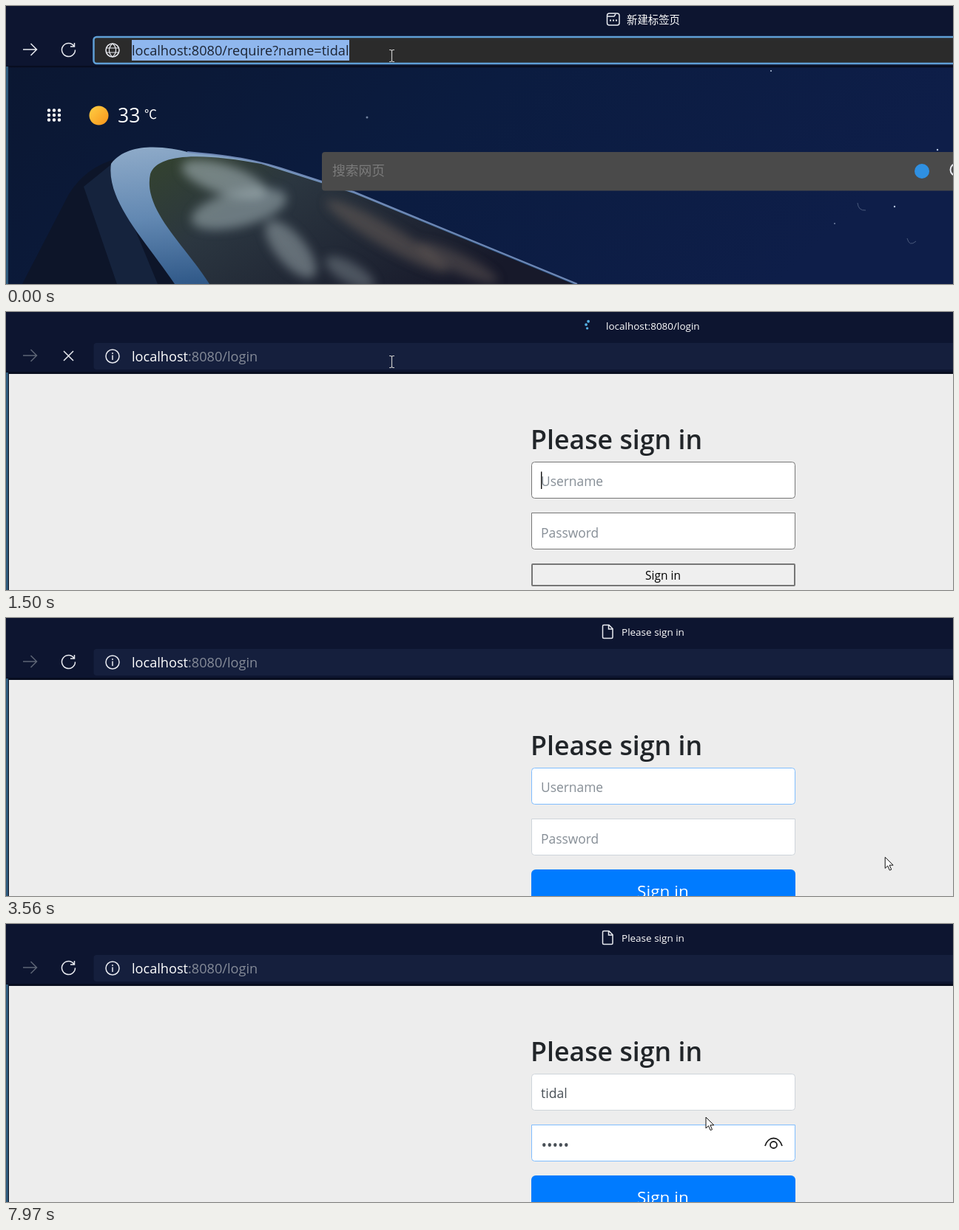
These frames come from a looping animation (1280x377 px, 8000 ms). An HTML page:

```html
<!DOCTYPE html>
<html lang="zh">
<head>
<meta charset="utf-8">
<title>Sign-in redirect</title>
<style>
  html, body { margin: 0; width: 100%; height: 100%; overflow: hidden; background: #0d1530; }
  svg { display: block; font-family: "Open Sans", "Noto Sans", sans-serif; }
  .cjk { font-family: "Noto Sans CJK SC", "Noto Sans CJK", sans-serif; }
  .line { fill: none; stroke: #e8eaf0; stroke-width: 1.5; }
  .url { font-size: 18.15px; fill: #858b98; }
  .url tspan { fill: #fff; }
  .tab { font-size: 13.5px; fill: #fff; }
  .hint { font-size: 17.4px; fill: #868e96; }
  .value { font-size: 17.6px; fill: #495057; }
</style>
</head>
<body>
<svg width="1280" height="377" viewBox="0 0 1280 377">
  <defs>
    <linearGradient id="sky" x2="1" y2=".25">
      <stop offset="0" stop-color="#0b1732"/><stop offset=".5" stop-color="#0b1c40"/><stop offset="1" stop-color="#0e1e49"/>
    </linearGradient>
    <linearGradient id="land" x2="1" y2=".5">
      <stop offset="0" stop-color="#34432f"/><stop offset=".35" stop-color="#2b3640"/><stop offset="1" stop-color="#17192a"/>
    </linearGradient>
    <linearGradient id="rim" x2=".3" y2="1">
      <stop offset="0" stop-color="#8fabc9"/><stop offset=".5" stop-color="#6288b2"/><stop offset="1" stop-color="#2c5585"/>
    </linearGradient>
    <linearGradient id="sun" x2="1" y2="1">
      <stop offset="0" stop-color="#ffd045"/><stop offset="1" stop-color="#f8941a"/>
    </linearGradient>
    <filter id="soft"><feGaussianBlur stdDeviation="7"/></filter>
    <clipPath id="inland"><use href="#ground"/></clipPath>
  </defs>

  <!-- browser bar -->
  <rect width="1280" height="377" fill="#0d1530"/>
  <g id="newTab">
    <rect class="line" x="812.5" y="10" width="16.5" height="16" rx="3"/>
    <path class="line" d="M813 14h9l2-3"/>
    <path d="M816 19.5h2m2 0h2m2 0h2" stroke="#fff" stroke-width="2"/>
    <text class="tab cjk" x="839" y="23.5" style="font-size:14.4px">新建标签页</text>
  </g>
  <g id="loadingTab">
    <g id="spinner" fill="#55b0e4"><circle r="1.9"/><circle r="1.9"/><circle r="1.7"/></g>
    <text class="tab" x="811" y="23.5">localhost:8080/login</text>
  </g>
  <g id="loginTab">
    <path class="line" d="M808 9.500h7l5 5v11.500q0 1.500-1.500 1.500h-10.500q-1.500 0-1.500-1.500v-15q0-1.500 1.500-1.500zM814.500 10v5h5"/>
    <text class="tab" x="832" y="23.5">Please sign in</text>
  </g>
  <path id="forward" class="line" d="M23 59h18.500M33.500 51l8 8-8 8"/>
  <path id="reload" class="line" d="M92 54.500a9 9 0 1 0 1.500 5M92.500 50v5h-5.500"/>
  <path id="stop" class="line" d="M78 53l13 13m0-13l-13 13"/>
  <rect id="bar" x="118.5" y="42" width="1180" height="36" rx="4"/>
  <circle class="line" cx="144" cy="60" r="9"/>
  <g id="focusedUrl">
    <path class="line" style="stroke-width:1.2" d="M135 57h18M135 63h18M144 51c-6 5-6 13 0 18c6-5 6-13 0-18"/>
    <rect x="170" y="46" width="294" height="28" fill="#8fb7ee"/>
    <text class="url" x="170" y="66.5" style="fill:#1c2433">localhost:8080/require?name=tidal</text>
  </g>
  <g id="plainUrl">
    <path class="line" d="M144 58.500v6.500M144 55v2"/>
    <text class="url" x="170" y="66.5"><tspan>localhost</tspan>:8080<tspan id="path" style="fill:inherit"></tspan></text>
  </g>
  <rect y="81" width="1280" height="2.5" fill="#080d20"/>
  <rect y="82" width="3" height="295" fill="#2f5a7c"/>

  <!-- start page -->
  <g id="startPage">
    <rect x="3" y="83.5" width="1277" height="294" fill="url(#sky)"/>
    <path d="M22 377L85 255Q108 218 150 207L240 377z" fill="#0d1529"/>
    <path d="M105 245L142 215L165 280L205 377H150z" fill="#15233d"/>
    <path d="M142 214C165 183 218 191 245 198C300 203 335 207 390 226L470 252L772 377H228C190 320 135 265 142 214z" fill="url(#rim)"/>
    <path id="ground" d="M195 228C205 198 270 200 345 214L470 254L767 377H275C240 322 185 276 195 228z" fill="url(#land)"/>
    <g clip-path="url(#inland)">
      <g filter="url(#soft)" fill="#a3b2b6">
        <ellipse cx="295" cy="235" rx="60" ry="20" transform="rotate(18 295 235)" opacity=".6"/>
        <ellipse cx="315" cy="275" rx="66" ry="24" transform="rotate(-14 315 275)" opacity=".55"/>
        <ellipse cx="385" cy="330" rx="48" ry="20" transform="rotate(50 385 330)" opacity=".5"/>
        <ellipse cx="465" cy="362" rx="38" ry="14" transform="rotate(30 465 362)" opacity=".35"/>
        <ellipse cx="515" cy="312" rx="95" ry="15" transform="rotate(30 515 312)" fill="#75695f" opacity=".45"/>
        <ellipse cx="610" cy="348" rx="60" ry="13" transform="rotate(25 610 348)" fill="#75695f" opacity=".4"/>
      </g>
    </g>
    <path d="M245 198C300 203 335 207 390 226L470 252L772 377" fill="none" stroke="#7089b6" stroke-width="2"/>
    <g fill="#b9c9e2">
      <circle cx="1034" cy="88" r="1"/><circle cx="1259" cy="195" r="1.2"/><circle cx="1201" cy="272" r="1.2"/>
      <circle cx="488" cy="151" r="1.5" opacity=".6"/><circle cx="1120" cy="295" r=".8"/>
    </g>
    <path d="M1151 267q1 11 11 10M1218 315q3 12 12 4" fill="none" stroke="#4b5b7d"/>
    <path d="M58 141.500h14.100M58 148h14.100M58 154.500h14.100" stroke="#fff" stroke-width="4.4" stroke-linecap="round" stroke-dasharray="0 7"/>
    <circle cx="125.5" cy="148.5" r="13" fill="url(#sun)"/>
    <text x="151" y="158" font-size="26.5" fill="#fff">33</text>
    <text class="cjk" x="187" y="152.5" font-size="17" fill="#fff">℃</text>
    <rect x="427" y="198" width="870" height="52.5" rx="4" fill="#4a4a4a"/>
    <text class="cjk" x="441" y="229.5" font-size="17.8" fill="#7b7b7b">搜索网页</text>
    <circle cx="1238" cy="224" r="10" fill="#2f90e2"/>
    <circle class="line" cx="1285" cy="222" r="8.5" style="stroke-width:2"/>
  </g>

  <!-- sign-in page -->
  <g id="loginPage">
    <rect x="3" y="83" width="1277" height="294" fill="#0b1020"/>
    <rect x="4" y="84" width="1276" height="293" fill="#ededed"/>
    <text x="709" y="186" font-size="35.7" font-weight="600" fill="#212529">Please sign in</text>
    <rect id="userBox" x="710.5" y="203.5" width="356" height="49" rx="4" fill="#fff"/>
    <path id="passBox" d="M710.500 272.500h356v45q0 4-4 4h-348q-4 0-4-4z" fill="#fff"/>
    <text id="userHint" class="hint" x="723" y="236">Username</text>
    <text id="passHint" class="hint" x="723" y="305.5">Password</text>
    <text id="user" class="value" x="723" y="236"></text>
    <text id="pass" class="value" x="723.5" y="306.5" style="font-size:20px"></text>
    <g id="eye" fill="none" stroke="#222" stroke-width="1.8">
      <path d="M1026 301c4-14 19-14 23 0"/><circle cx="1037.5" cy="299.5" r="4.5"/>
    </g>
    <rect id="caret" width="1.4" height="23.5" fill="#111"/>
    <rect id="button"/>
    <text id="buttonText" x="888" text-anchor="middle">Sign in</text>
  </g>

  <path id="beam" fill="none" stroke-width="1.2" d="M-3.500-8h2l1.500 1 1.500-1h2M0-7v14M-3.500 8h2l1.500-1 1.500 1h2"/>
  <path id="arrow" fill="#fff" stroke="#111" d="M0 0v15l3.500-3.300 2.600 6 2.400-1-2.600-5.900h5z"/>
</svg>
<script>
const LOOP = 8000, NAVIGATE = 1030, COMMIT = 1450, PAINT = 1500, STYLED = 1550, TITLED = 1650, TAB_KEY = 6140;
const NAME = 'tidal';
const userKeys = [4690, 4910, 5480, 5560, 5630];
const passKeys = [6700, 7080, 7180, 7260, 7340];
const caretResets = [PAINT, ...userKeys, TAB_KEY, ...passKeys];
// time, x, y
const mousePath = [
  [1550, 521, 67], [1850, 760, 150], [2170, 1090, 325], [2480, 1003, 306], [2670, 985, 296],
  [3100, 1120, 262], [3540, 1190, 325], [3900, 1010, 262], [4360, 898, 230],
  [7640, 898, 230], [7950, 946, 262]
];
const GREY = [118, 118, 118], IDLE = [206, 212, 218], FOCUS = [128, 189, 255];

const $ = id => document.getElementById(id);
const show = (id, on) => { $(id).style.display = on ? '' : 'none'; };
const set = (node, attrs) => { for (const k in attrs) node.setAttribute(k, attrs[k]); };
const ramp = (t, start, length) => Math.min(1, Math.max(0, (t - start) / length));
const mix = (a, b, p) => `rgb(${a.map((v, i) => Math.round(v + (b[i] - v) * p))})`;
const typed = (keys, t) => keys.filter(k => k <= t).length;

function mouseAt(t) {
  const next = mousePath.findIndex(p => p[0] > t);
  if (next === 0) return mousePath[0].slice(1);
  if (next < 0) return mousePath.at(-1).slice(1);
  const [t0, x0, y0] = mousePath[next - 1], [t1, x1, y1] = mousePath[next];
  const p = ramp(t, t0, t1 - t0), e = p * p * (3 - 2 * p);
  return [x0 + (x1 - x0) * e, y0 + (y1 - y0) * e];
}

function drawBrowser(t) {
  const focused = t < NAVIGATE, committed = t >= COMMIT, loaded = t >= TITLED;
  show('newTab', !committed);
  show('loadingTab', committed && !loaded);
  show('loginTab', loaded);
  show('reload', focused || loaded);
  show('stop', !focused && !loaded);
  show('focusedUrl', focused);
  show('plainUrl', !focused);
  show('startPage', !committed);
  show('loginPage', t >= PAINT);
  $('path').textContent = committed ? '/login' : '/require?name=' + NAME;
  $('forward').style.stroke = committed ? '#5d6575' : '#e8eaf0';
  set($('bar'), focused
    ? { fill: '#2b2b2b', stroke: '#5f9fd6', 'stroke-width': 2.5 }
    : { fill: '#151f3d', stroke: 'none' });
  [...$('spinner').children].forEach((dot, i) => {
    const a = (231 - i * 52 + (t - COMMIT) * .2) * Math.PI / 180;
    set(dot, { cx: 790 + 6 * Math.cos(a), cy: 18 + 6 * Math.sin(a) });
  });
}

function drawForm(t) {
  const styled = t >= STYLED, fade = ramp(t, STYLED, 150), swap = ramp(t, TAB_KEY, 150);
  const onPass = t >= TAB_KEY;
  const letters = typed(userKeys, t), dots = typed(passKeys, t);
  $('user').textContent = NAME.slice(0, letters);
  $('pass').textContent = '•'.repeat(dots);
  show('userHint', !letters);
  show('passHint', !dots);
  show('eye', dots);
  $('userBox').setAttribute('stroke', onPass ? mix(FOCUS, IDLE, swap) : mix(GREY, FOCUS, fade));
  $('passBox').setAttribute('stroke', onPass ? mix(IDLE, FOCUS, swap) : mix(GREY, IDLE, fade));

  const reset = caretResets.filter(k => k <= t).at(-1);
  const field = $(onPass ? 'pass' : 'user');
  show('caret', Math.floor((t - reset) / 530) % 2 === 0);
  set($('caret'), { x: 723 + field.getComputedTextLength(), y: onPass ? 286 : 216.5 });

  set($('button'), styled
    ? { x: 710, y: 341, width: 357, height: 60, rx: 6, fill: mix([239, 239, 239], [0, 123, 255], fade), stroke: 'none' }
    : { x: 711, y: 342, width: 355, height: 29, rx: 1, fill: '#efefef', stroke: '#767676', 'stroke-width': 2 });
  set($('buttonText'), {
    y: styled ? 378.5 : 363, 'font-size': styled ? 22.6 : 15.5,
    fill: mix([0, 0, 0], [255, 255, 255], fade)
  });
}

function drawMouse(t) {
  const [x, y] = mouseAt(t);
  const inside = (l, top, r, b) => x > l && x < r && y > top && y < b;
  const overText = inside(118, 42, 1280, 79) || inside(710, 155, 942, 195)
    || inside(710, 203, 1067, 253) || inside(710, 272, 1067, 322);
  show('beam', overText);
  show('arrow', !overText);
  set($('beam'), { transform: `translate(${x + .5} ${y + .5})`, stroke: y < 83 ? '#c8c8c8' : '#111' });
  set($('arrow'), { transform: `translate(${x} ${y})` });
}

function frame() {
  const t = performance.now() % LOOP;
  drawBrowser(t);
  if (t >= PAINT) drawForm(t);
  drawMouse(t);
  requestAnimationFrame(frame);
}
frame();
</script>
</body>
</html>
```
